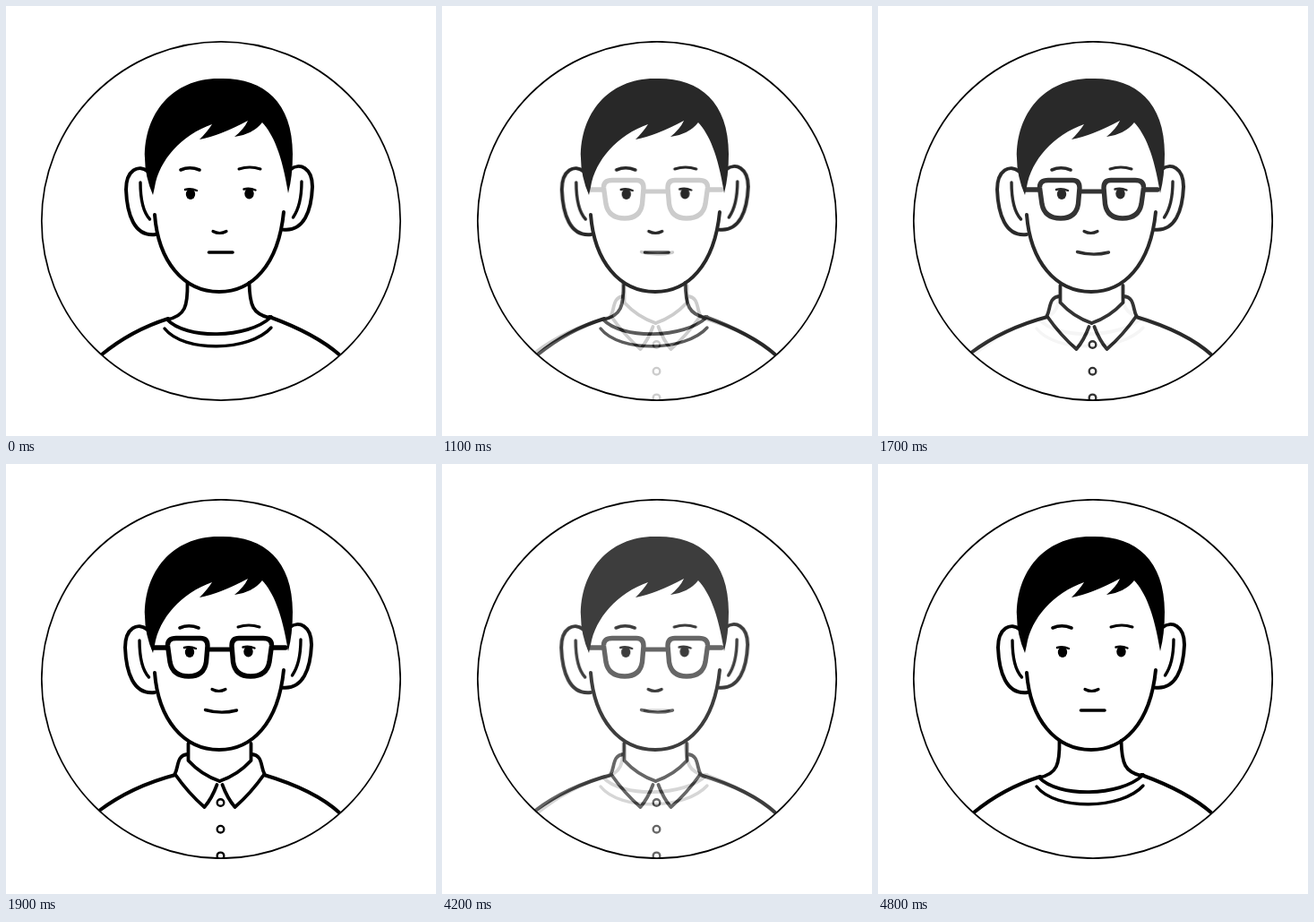
Animation of 480 by 480 pixels, one loop 5800 ms. Source, as an HTML page:

```html
<!DOCTYPE html>
<html lang="en">
<head>
<meta charset="utf-8">
<title>Portrait crossfade</title>
<style>
  html, body { margin: 0; width: 100%; height: 100%; overflow: hidden; background: #fff; }
  svg { display: block; width: 100vw; height: 100vh; }
  .line { fill: none; stroke: #000; stroke-linecap: round; stroke-linejoin: round; }
</style>
</head>
<body>
<svg viewBox="0 0 480 480">
  <defs><clipPath id="disc"><circle cx="240" cy="240" r="200"/></clipPath></defs>
  <g clip-path="url(#disc)">
    <g id="plain"></g>
    <g id="smart"></g>
  </g>
  <circle class="line" cx="240" cy="240" r="200.2" stroke-width="1.7"/>
</svg>
<script>
const LOOP = 5800, STEP = 100, STEPS = 10, FADE_IN = 1000, FADE_OUT = 3900;
const MIRROR = 'translate(477 0) scale(-1 1)';

const line = (d, width = 3.8) => `<path class="line" stroke-width="${width}" d="${d}"/>`;
const group = (transform, body) => `<g transform="${transform}">${body}</g>`;
const pair = (body, transform = MIRROR) => body + group(transform, body);

const eye = (x, y) =>
  `<ellipse cx="${x}" cy="${y + 1}" rx="5.2" ry="6"/>` +
  line(`M${x - 6} ${y - 4}q6 -2 13 1`, 2.4);

const hair = `<path d="M164 211Q155 190 155 170C154 120 186 81 237 81
  C285 79 320 105 320 165Q320 190 315 209C308 165 298 143 286 130
  Q276 143 255 146Q266 137 270 128Q238 145 216 149Q225 140 230 132
  C196 144 171 172 166 202Z"/>`;

// The right ear is the left one mirrored, a little shorter and higher.
const ears =
  pair(line('M159 185C148 176 134 183 134 205C135 232 143 258 167 255', 4),
    'translate(476 6) scale(-1 .955)') +
  line('M150 197C150 216 154 231 160.5 238', 3.4) +
  line('M330 196C330 214 326 228 320.5 236', 3.4);

const features =
  line('M195 183Q205 178.5 216 183', 3.6) +
  line('M260 182Q272 178 284 182', 3) +
  eye(206, 209) + eye(271.5, 208.5) +
  line('M231 251.5q7.5 4 15 0', 3.2);

const head = dx =>
  '<circle cx="240" cy="240" r="201" fill="#fff"/>' + hair +
  line('M166 233C170 285 198 319 238 319C274 319 304 290 310 230', 4) +
  group(`translate(${dx} 0)`, ears + features);

const tee =
  line('M202.5 309C203 335 200 346 180 350') +
  line('M271.5 309C272 335 276 344 294 348') +
  line('M107 389Q140 362 181 349', 4) +
  line('M294 347Q346 366 373 390', 4) +
  line('M180 350C200 372 270 372 296 347') +
  line('M177 360C198 387 272 386 296 359', 3.4);

const glasses =
  pair(
    line(`M180.5 203Q180 194.5 190 194.5H217Q225 194.5 225 203
      L223.5 221Q221 237 204 237Q186 237 183 221Z`, 5.4) +
    line('M165 205H180', 5.4)) +
  line('M225 207H252', 5.2);

const shirt =
  pair(
    line('M203.5 312V331Q218 347 238.5 354') +
    line('M203 324C190 325 193 338 188.5 346Q204 368 221.5 383Q230 373 235.5 358')) +
  line('M104 387Q140 360 189 347', 4) +
  line('M288 347Q345 364 373 390', 4) +
  [0, 1, 2].map(i =>
    `<circle class="line" stroke-width="2.4" cx="239.5" cy="${378 + 29.7 * i}" r="3.8"/>`).join('');

const plain = document.getElementById('plain');
const smart = document.getElementById('smart');
plain.innerHTML = head(0) + line('M226.5 275H253', 3.6) + tee;
smart.innerHTML = head(-1) + line('M222.5 274.5Q240 279.5 257.5 275', 3.4) + glasses + shirt;

const progress = (t, start) =>
  Math.max(0, Math.min(STEPS, Math.floor((t - start) / STEP) + 1)) / STEPS;

function draw(t) {
  const mix = progress(t, FADE_IN) - progress(t, FADE_OUT);
  plain.setAttribute('opacity', 1 - mix);
  smart.setAttribute('opacity', mix);
}

const begin = performance.now();
function tick() {
  draw((performance.now() - begin) % LOOP);
  requestAnimationFrame(tick);
}
tick();
</script>
</body>
</html>
```
